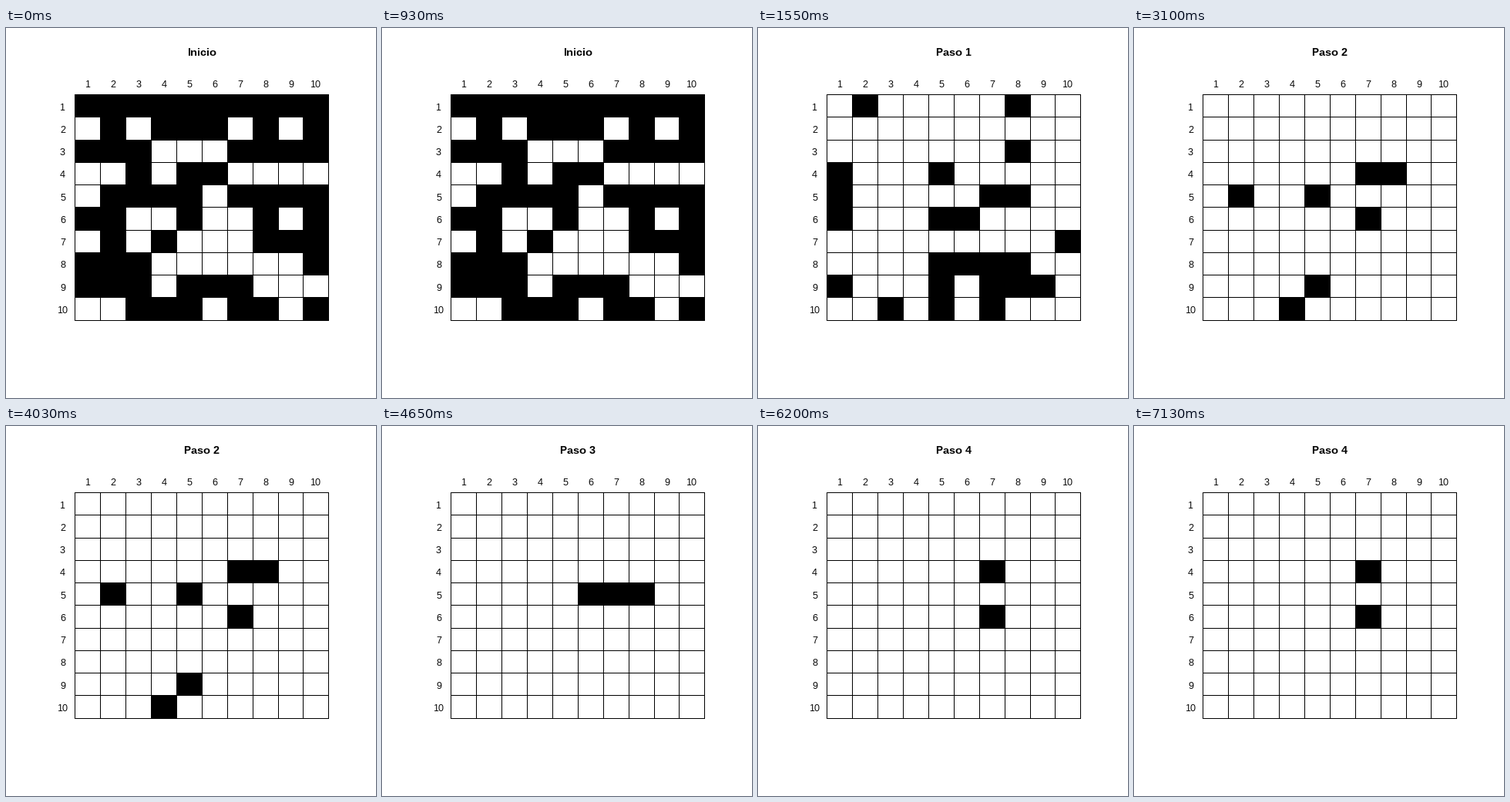
These frames come from a looping animation (480 px wide and 480 px high, 7750 ms). A matplotlib script:

```python
import numpy as np
import matplotlib.pyplot as plt
from matplotlib.animation import FuncAnimation
from matplotlib.patches import Rectangle

plt.rcParams.update({
    "font.family": "Liberation Sans",
    "text.hinting": "native",
    "text.hinting_factor": 1,
})

SIZE, DPI, N = 480, 72, 10
STEPS, HOLD = 5, 1550
STEP_X, STEP_Y = 390.72 / 11.88, 347.52 / 11.88

# "#" marks a live cell
START = """
##########
.#.###.#.#
###...####
..#.##....
.####.####
##..#..#.#
.#.#...###
###......#
###.###...
..###.##.#
""".split()


def pos(k, step):
    """Pixel position of grid coordinate k (0 is the label row or column)."""
    return 59.04 + (k + 0.44) * step


def evolve(board):
    """A cell lives next turn only with exactly three live neighbours."""
    p = np.pad(board, 1)
    total = sum(p[i:i + N, j:j + N] for i in range(3) for j in range(3))
    return (total - board == 3).astype(int)


boards = [np.array([[int(c == "#") for c in row] for row in START])]
while len(boards) < STEPS:
    boards.append(evolve(boards[-1]))

fig = plt.figure(figsize=(SIZE / DPI, SIZE / DPI), dpi=DPI, facecolor="white")
ax = fig.add_axes([0, 0, 1, 1])
ax.set(xlim=(0, SIZE), ylim=(SIZE, 0))
ax.axis("off")


def box(x, y, w, h):
    return ax.add_patch(Rectangle((x, y), w, h, fc="black", lw=0, aa=False))


def label(x, y, s, **kw):
    return ax.text(x, y, s, ha="center", va="baseline", color="black", **kw)


edges = np.arange(N + 1) + 0.5
xs = np.floor(pos(edges, STEP_X)).astype(int)
ys = np.floor(pos(edges, STEP_Y)).astype(int)

for x in xs:
    box(x, ys[0], 1, ys[-1] - ys[0] + 1)
for y in ys:
    box(xs[0], y, xs[-1] - xs[0] + 1, 1)

cells = [[box(xs[c], ys[r], xs[c + 1] - xs[c], ys[r + 1] - ys[r])
          for c in range(N)] for r in range(N)]

for k in range(1, N + 1):
    label(pos(k, STEP_X), 77, str(k), size=12)
    label(pos(0, STEP_X), round(pos(k, STEP_Y) + 5.4), str(k), size=12)

title = label(pos(5.5, STEP_X), 36, "", size=14, weight="bold")


def draw(i):
    title.set_text(f"Paso {i}" if i else "Inicio")
    for row, states in zip(cells, boards[i]):
        for cell, alive in zip(row, states):
            cell.set_visible(bool(alive))
    return [title]


anim = FuncAnimation(fig, draw, frames=STEPS, interval=HOLD, repeat=True,
                     repeat_delay=0, blit=False)
plt.show()
```
